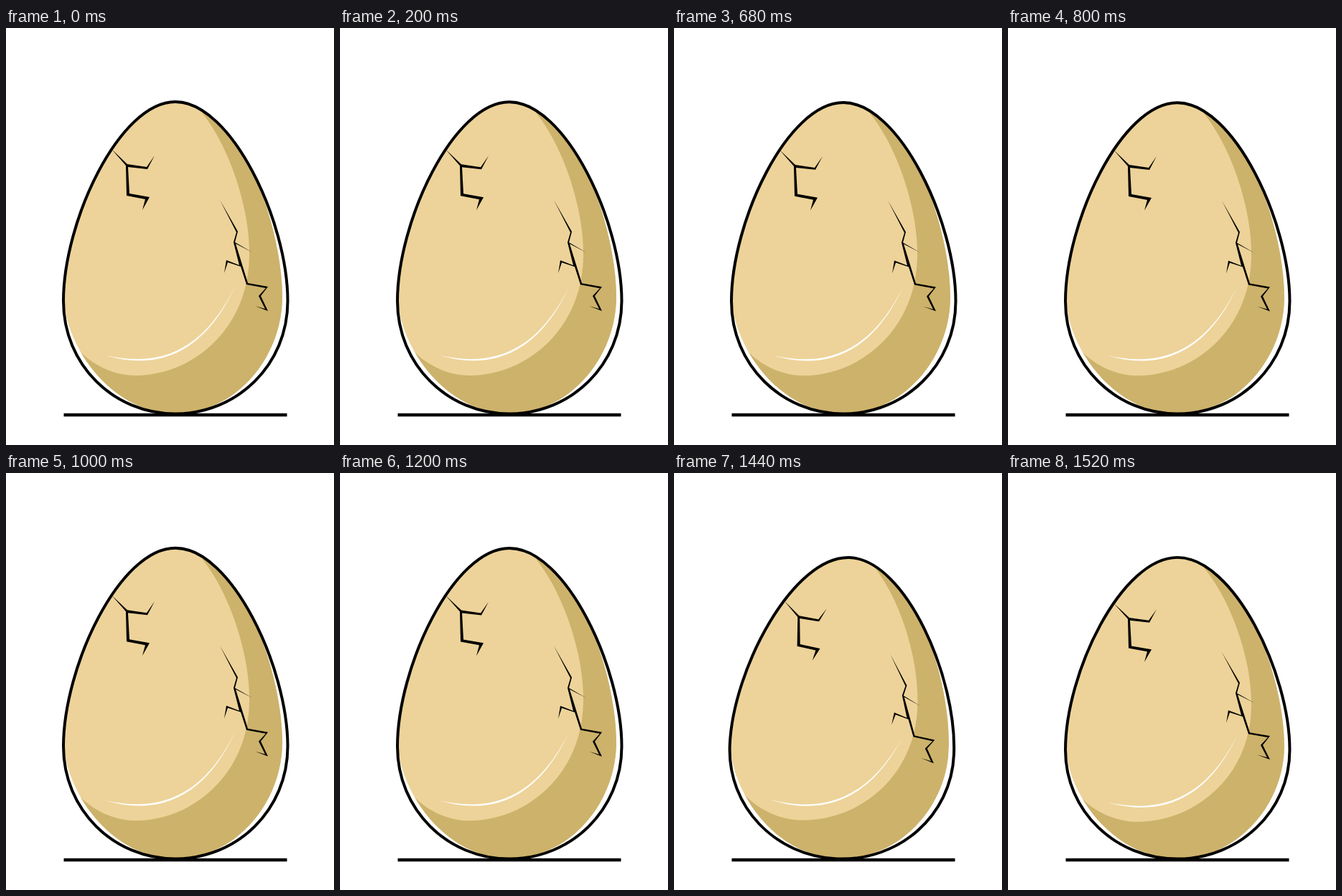
Recreate the animation shown at these times as an HTML page. Size 457 by 582 pixels, loop 1.56 s.

```html
<!DOCTYPE html>
<html lang="en">
<head>
<meta charset="utf-8">
<title>Cracking egg</title>
<style>
  html, body { margin: 0; width: 100%; height: 100%; overflow: hidden; background: #fff; }
  svg { display: block; width: 100%; height: 100%; }
</style>
</head>
<body>
<svg viewBox="0 0 457 582">
  <defs>
    <clipPath id="body">
      <path d="M236 103 C158 103 80 270 80 375 C84 450 150 538 236 538 C320 538 385 460 385 375 C385 310 360 230 340 195 C310 138 274 103 236 103 Z"/>
    </clipPath>
  </defs>
  <path d="M80.500 540 H391.500" stroke="#000" stroke-width="4.400"/>
  <g id="egg">
    <path d="M236 103 C158 103 80 270 80 381 C80 470 150 538.500 236 538.500 C322 538.500 392.500 470 392.500 381 C392.500 270 314 103 236 103 Z" fill="#fff"/>
    <g clip-path="url(#body)">
      <rect x="70" y="95" width="330" height="450" fill="#edd399"/>
      <path d="M268 112 C310 160 340 250 339 318 C338 420 260 485 180 485 C150 485 120 470 102 450 L90 560 H420 V100 Z" fill="#cdb26b"/>
    </g>
    <path d="M139 457 C190 472 268 474 320 359 C266 471 191 468 139 457 Z" fill="#fff"/>
    <path d="M236 103 C158 103 80 270 80 381 C80 470 150 538.500 236 538.500 C322 538.500 392.500 470 392.500 381 C392.500 270 314 103 236 103 Z" fill="none" stroke="#000" stroke-width="4"/>
    <path d="M147 169 L169 190 L196 194 L207 178 L197 197 L170 194 L172 231 L200 236 L190 254 L194 239 L168 234 L167 192 Z"/>
    <path d="M298 240 L323 284 L319 299 L343 313 L320 301 L337 356 L365 361 L355 374 L365 395 L347 388 L361 392 L352 374 L362 363 L335 358 L327 333 L309 327 L304 342 L307 324 L325 331 L317 299 L321 285 Z"/>
  </g>
</svg>
<script>
  const LOOP = 1560, STEP = 40, GROUND = 540;
  const egg = document.getElementById('egg');

  // [time, value] pairs
  const squash = [[0, 1], [1200, 0.9955], [1280, 0.966], [LOOP, 0.966]];
  const tilt = [[0, 0], [1200, 0], [1280, -6.5], [1400, 3.2], [1520, 0], [LOOP, 0]];

  const linear = u => u;
  const smooth = u => (1 - Math.cos(Math.PI * u)) / 2;

  function at(keys, t, ease) {
    const i = keys.findIndex(k => t < k[0]);
    const [t0, a] = keys[i - 1], [t1, b] = keys[i];
    return a + (b - a) * ease((t - t0) / (t1 - t0));
  }

  function draw(ms) {
    const t = Math.floor(ms % LOOP / STEP) * STEP;
    const s = at(squash, t, linear);
    const angle = at(tilt, t, smooth);
    egg.setAttribute('transform',
      `rotate(${angle} 236 329) translate(0 ${GROUND * (1 - s)}) scale(1 ${s})`);
  }

  const start = performance.now();
  function tick() {
    draw(performance.now() - start);
    requestAnimationFrame(tick);
  }
  tick();
</script>
</body>
</html>
```
